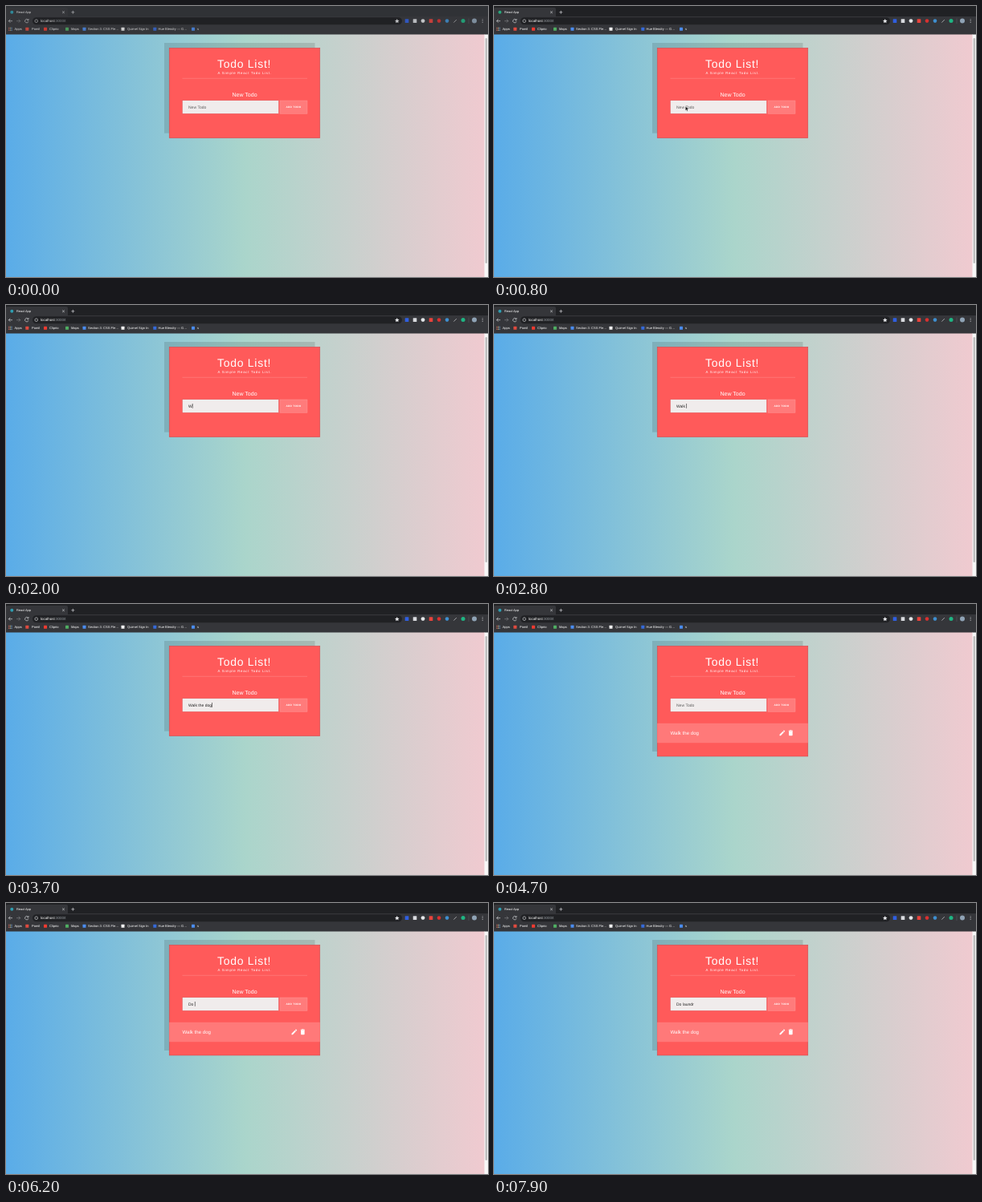
Write an HTML page that moves like this. It is 600 px wide and 338 px high and loops after 8 s.

```html
<!DOCTYPE html>
<html lang="en">
<head>
<meta charset="utf-8">
<title>Todo List</title>
<style>
html, body { margin: 0; width: 100%; height: 100%; overflow: hidden; }
svg { display: block; width: 100vw; height: 100vh; }
text { font-family: "Liberation Sans", Arial, sans-serif; fill: #fff; text-rendering: geometricPrecision; }
.line { fill: none; stroke: #d0d2d5; stroke-width: .7; }
</style>
</head>
<body>
<svg viewBox="0 0 600 338" preserveAspectRatio="none">
  <defs>
    <linearGradient id="sky">
      <stop offset="0" stop-color="#5aace8"/>
      <stop offset=".5" stop-color="#aad5cb"/>
      <stop offset="1" stop-color="#f0cad0"/>
    </linearGradient>
  </defs>

  <!-- browser window -->
  <rect width="600" height="36" fill="#35363a"/>
  <rect id="strip" width="600" height="13"/>
  <path d="M0 13V4q0-2 2-2H75q2 0 2 2V13z" fill="#35363a"/>
  <rect x="33" y="14.3" width="460" height="9" rx="4.5" fill="#202124"/>
  <g id="chrome">
    <circle id="favicon" cx="7.3" cy="7.8" r="2"/>
    <text x="13" y="9.3" font-size="3.9">React App</text>
    <path class="line" d="M70.2 6.5l2.6 2.6m0-2.6l-2.6 2.6M81.3 7.8h4m-2-2v4"/>
    <path class="line" d="M8 18.7H3.3m2-2l-2 2 2 2"/>
    <path class="line" stroke-opacity=".45" d="M13 18.7h4.7m-2-2l2 2-2 2"/>
    <path class="line" d="M27.5 17.3a2.2 2.2 0 1 0 .4 2M28 16v1.8h-1.8"/>
    <circle class="line" cx="37.7" cy="18.7" r="1.8"/>
    <text x="43" y="20.3" font-size="4.5">localhost<tspan fill="#9aa0a6">:3000/t</tspan></text>
    <path d="M486.8 16l.8 1.8 2 .2-1.5 1.3.5 2-1.8-1.1-1.8 1.1.5-2-1.5-1.3 2-.2z" fill="#e8eaed"/>
    <path class="line" d="M557.3 20.6l3.5-3.5" stroke-width="1"/>
    <path d="M576 15.5v6.5" stroke="#5f6368" stroke-width=".5"/>
    <circle cx="583" cy="18.6" r="3" fill="#8fa3b5"/>
    <path d="M593.2 16.5v4.4" stroke="#d0d2d5" stroke-dasharray=".8 1"/>
    <g id="marks"></g>
  </g>

  <!-- page -->
  <rect y="35.5" width="596" height="302.5" fill="url(#sky)"/>
  <rect x="595.5" y="35.5" width="4.5" height="302.5" fill="#f7f7f7"/>
  <rect x="596.6" y="40" width="2.4" height="281" rx="1.2" fill="#bdbdbd"/>

  <!-- card -->
  <rect id="shade" x="197" y="46" width="187.5" fill="#000" opacity=".12"/>
  <rect id="card" x="203.2" y="52.3" width="187.6" fill="#ff5a5a" stroke="#c8474c" stroke-width=".5"/>
  <text x="263" y="77" font-size="14" letter-spacing=".72">Todo List!</text>
  <text x="263.6" y="85.3" font-size="4.3" letter-spacing=".72">A Simple React Todo List.</text>
  <path d="M219.5 90.3H375" stroke="#ff8f8f" stroke-width=".5"/>
  <text x="297" y="113.4" font-size="7.05" text-anchor="middle">New Todo</text>
  <rect x="219.5" y="117.8" width="120" height="16.5" fill="#f0ecec" stroke="#d44c50" stroke-width=".4"/>
  <rect x="341" y="118" width="34" height="16.3" fill="#ff7b7b" stroke="#ff9c9c" stroke-width=".4"/>
  <text x="348.4" y="127.2" font-size="3.2" font-weight="700" letter-spacing=".27">ADD TODO</text>
  <text id="entry" x="227" y="127.5" font-size="5"></text>
  <rect id="caret" y="123" width=".6" height="5.8" fill="#222"/>

  <g id="item">
    <rect x="203.2" y="148.8" width="187.6" height="24.4" fill="#ff7979"/>
    <text x="219.6" y="162.9" font-size="6.1">Walk the dog</text>
    <path transform="translate(354.4 156.4) scale(.37)" fill="#fff" d="M3 17.25V21h3.75L17.81 9.94l-3.75-3.75L3 17.25zM20.71 7.04c.39-.39.39-1.02 0-1.41l-2.34-2.34c-.39-.39-1.02-.39-1.41 0l-1.83 1.83 3.75 3.75 1.83-1.83z"/>
    <path transform="translate(364.8 156.2) scale(.38)" fill="#fff" d="M6 19c0 1.1.9 2 2 2h8c1.1 0 2-.9 2-2V7H6v12zM19 4h-3.5l-1-1h-5l-1 1H5v2h14V4z"/>
  </g>
  <path id="pointer" d="M0 0V5.4L1.2 4.3 2 6.2 3 5.8 2.2 4H3.9z" fill="#000" stroke="#fff" stroke-width=".4"/>
</svg>

<script>
const $ = id => document.getElementById(id);
const square = (x, y, size, color) =>
  `<rect x="${x - size / 2}" y="${y - size / 2}" width="${size}" height="${size}" rx=".5" fill="${color}"/>`;
const dot = (x, y, r, color) => `<circle cx="${x}" cy="${y}" r="${r}" fill="${color}"/>`;

// Bookmarks: icon x, colour, label x, label
const bookmarks = [
  [26.3, '#e04a3f', 32, 'Pomil'],
  [49, '#f03a30', 54, 'Cliprio'],
  [76, '#4fae62', 81, 'Maps'],
  [97.5, '#4a8cf0', 102, 'Section 3: CSS Fle…'],
  [145.5, '#f2f2f2', 151, 'Quimel Sign In'],
  [185.3, '#3569d8', 189.5, 'Hue Blendry — G…'],
  [233, '#4a8cf0', 238, 's']
];
const label = (x, text) => `<text x="${x}" y="30.2" font-size="4.05">${text}</text>`;
let marks = label(10.5, 'Apps');
for (let i = 0; i < 9; i++)
  marks += dot(3.8 + i % 3 * 1.6, 27.2 + Math.floor(i / 3) * 1.6, .6, ['#d9675c', '#a9a074', '#6f9fd8'][i % 3]);
for (const [x, color, tx, text] of bookmarks) marks += square(x, 28.8, 4, color) + label(tx, text);
marks += square(499, 18.6, 4.6, '#2f5fe0') + square(509, 18.6, 4.6, '#d8dade')
  + dot(519, 18.6, 2.4, '#e4e6e8') + square(529, 18.6, 4.6, '#e8433c')
  + dot(539, 18.6, 2.3, '#d93030') + dot(549, 18.6, 2.3, '#3f8fd0') + dot(569, 18.6, 2.5, '#1fb583');
$('marks').innerHTML = marks;

const LOOP = 8000, ACTIVE = 300, FOCUS = 1000, ADDED = 4100;
const walk = 'Walk the dog', laundry = 'Do laundr';
// Key press times for each letter
const walkKeys = [1900, 2200, 2400, 2600, 2800, 2900, 3000, 3100, 3200, 3300, 3500, 3600];
const laundryKeys = [5500, 5800, 6100, 6400, 6600, 6800, 6900, 7100, 7300];

function show(id, on) { $(id).setAttribute('visibility', on ? 'visible' : 'hidden'); }

function draw(now) {
  const t = Math.floor(now % LOOP / 100) * 100;
  const active = t >= ACTIVE, added = t >= ADDED;

  $('strip').setAttribute('fill', active ? '#202124' : '#303236');
  $('chrome').setAttribute('opacity', active ? 1 : .8);
  $('favicon').setAttribute('fill', active && t < 1200 ? '#27a77c' : '#2f9db0');

  const keys = added ? laundryKeys : walkKeys;
  const pressed = keys.filter(k => k <= t);
  const typed = (added ? laundry : walk).slice(0, pressed.length);
  const entry = $('entry');
  entry.textContent = (typed || 'New Todo').replace(/ /g, '\u00a0');
  entry.style.fill = typed ? '#222' : '#5c5c5c';

  const since = t - Math.max(FOCUS, added ? ADDED : 0, ...pressed);
  $('caret').setAttribute('x', 227.1 + (typed ? entry.getComputedTextLength() : 0));
  show('caret', t >= FOCUS && since % 1000 < 500);

  $('card').setAttribute('height', added ? 137.7 : 112.4);
  $('shade').setAttribute('height', added ? 138 : 112.7);
  show('item', added);

  const p = Math.min(1, Math.max(0, (t - ACTIVE) / 400)), ease = 1 - (1 - p) ** 3;
  $('pointer').setAttribute('transform', `translate(${250 - 11.7 * ease} ${136 - 11 * ease})`);
  show('pointer', active && t < walkKeys[0]);
}

const start = performance.now();
function tick() {
  draw(performance.now() - start);
  requestAnimationFrame(tick);
}
tick();
</script>
</body>
</html>
```
